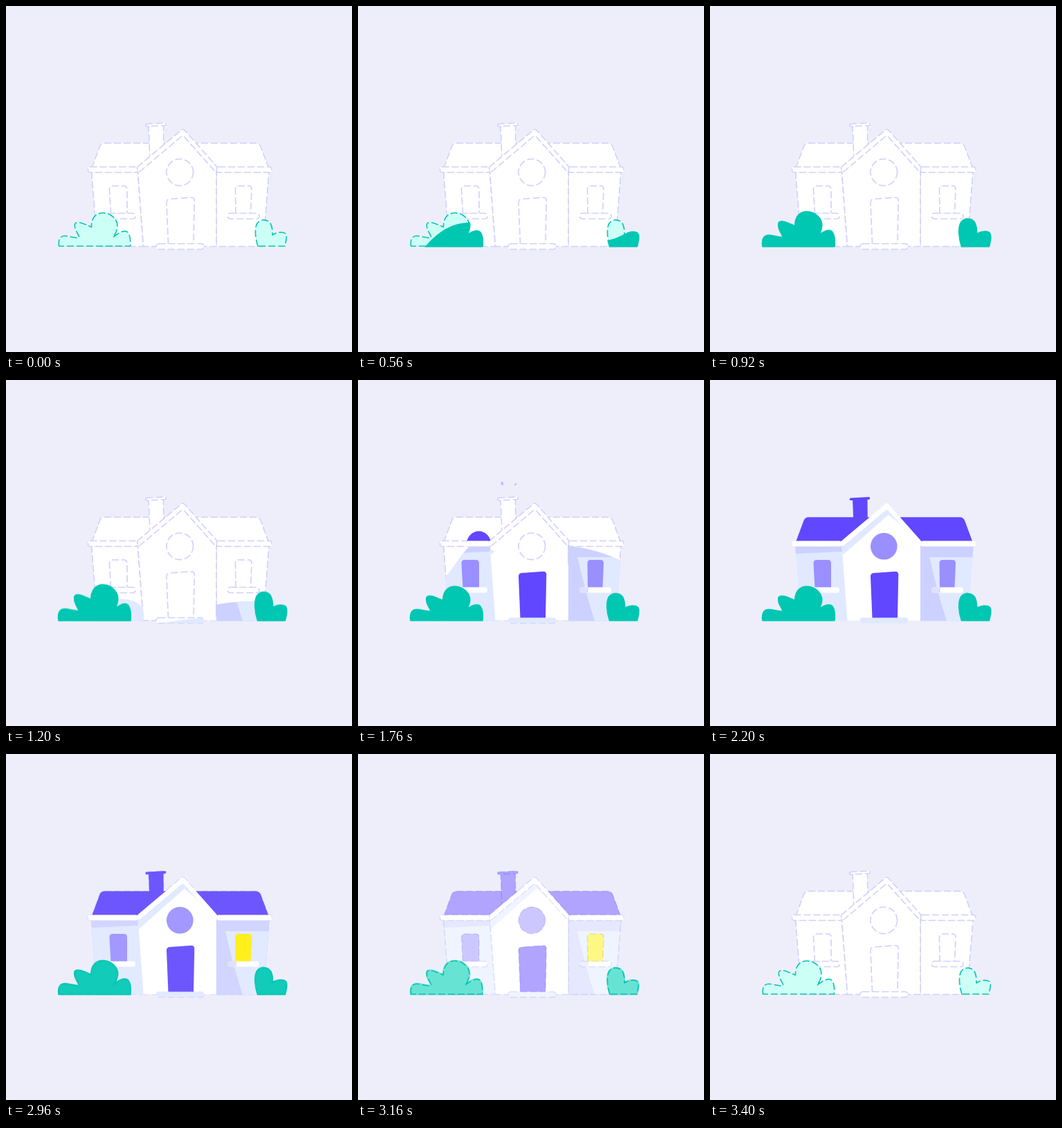
Animation of 500 by 500 pixels, one loop 3.52 s. Source, as an HTML page:

```html
<!DOCTYPE html>
<html lang="en">
<head>
<meta charset="utf-8">
<title>House being painted</title>
<style>
  html, body { margin: 0; width: 100%; height: 100%; overflow: hidden; background: #eeeefb; }
  .stage { position: relative; width: 500px; height: 500px; overflow: hidden; }
  .stage svg, .paint, .shrubs { position: absolute; inset: 0; width: 500px; height: 500px; }
  .stage * { animation: 3.52s linear infinite; }
  .paint, .shrubs { transform-origin: 250px 348px; }

  .sketch { animation-name: sketch; }
  .sketch use { fill: #fff; stroke: #d0d0fb; stroke-width: 1.6; stroke-dasharray: 9 5; stroke-linecap: round; stroke-linejoin: round; }
  .sketch .leaf { fill: #ccfff5; stroke: #00c7b2; }
  .leafy { fill: #00c7b2; stroke: #00c7b2; stroke-width: 3; stroke-linejoin: round; }
  .pale { fill: #e0e9ff; }
  .shade { fill: #cdd1ff; }
  .deep { fill: #6147ff; }
  .glass { fill: #9a8fff; }
  .white { fill: #fff; }

  .paint { animation-name: settle, fade; }
  .shrubs { animation-name: hop; }
  .bush-left { animation-name: bushLeft; }
  .bush-right { animation-name: bushRight; }
  .wall-left { animation-name: wallLeft; }
  .wall-right { animation-name: wallRight; }
  .front { animation-name: front; }
  .roof { animation-name: roof; }
  .lamp { animation-name: lamp; }
  .puff { fill: #c0b5ff; animation-name: puff; }
  .puff.a { --from: translate(22px, 38px); transform-origin: 192px 122px; }
  .puff.b { --from: translate(-20px, 34px); transform-origin: 242px 126px; }

  @keyframes sketch {
    0%, 54.5% { opacity: 1; }
    54.51%, 82.9% { opacity: 0; }
    82.91%, 100% { opacity: 1; }
  }
  @keyframes fade {
    0%, 82.95% { opacity: 1; }
    96.59%, 100% { opacity: 0; }
  }
  @keyframes settle {
    0%, 50% { transform: none; }
    54.2% { transform: scaleY(1.032); }
    55.68% { transform: scaleY(1.022); animation-timing-function: ease-out; }
    62.5%, 100% { transform: none; }
  }
  @keyframes hop {
    0%, 23.8% { transform: none; animation-timing-function: ease-out; }
    32% { transform: scaleY(1.06); }
    34.09% { transform: scaleY(1.05); animation-timing-function: ease-in-out; }
    39.7%, 100% { transform: none; }
  }
  @keyframes lamp {
    0%, 67.04% { fill: #9a8fff; }
    67.05%, 100% { fill: #ffee08; }
  }
  @keyframes puff {
    0%, 49.4% { transform: var(--from) scale(0); animation-timing-function: ease-out; }
    53.1% { transform: translate(0, 0) scale(1.9); }
    54.55% { transform: translate(0, 0) scale(1.15); }
    55.68% { transform: translate(0, 0) scale(1); }
    58.5%, 100% { transform: translate(0, 0) scale(0); }
  }

  /* Curved paint fronts that rise over each part */
  @keyframes bushLeft {
    0%, 7.5% { clip-path: path("M60 500V450C105 390 130 360 200 350V500Z"); }
    15.91% { clip-path: path("M60 500V400C105 330 130 300 200 318V500Z"); }
    22.73%, 100% { clip-path: path("M60 500V300C105 270 130 270 200 270V500Z"); }
  }
  @keyframes bushRight {
    0%, 7.5% { clip-path: path("M350 500V362C372 360 382 356 420 348V500Z"); }
    15.91% { clip-path: path("M350 500V339C372 340 382 330 420 312V500Z"); }
    22.73%, 100% { clip-path: path("M350 500V290C372 290 382 290 420 290V500Z"); }
  }
  @keyframes wallLeft {
    0%, 25% { clip-path: path("M110 500V375C150 350 190 350 205 365V500Z"); }
    34.09% { clip-path: path("M110 500V350C150 305 190 310 205 340V500Z"); }
    38.64% { clip-path: path("M110 500V325C150 265 180 245 205 268V500Z"); }
    50% { clip-path: path("M110 500V300C150 270 140 240 205 215V500Z"); }
    53.41%, 100% { clip-path: path("M110 500V220C150 220 140 210 205 200V500Z"); }
  }
  @keyframes wallRight {
    0%, 25% { clip-path: path("M295 500V360C320 352 350 350 390 352V500Z"); }
    34.09% { clip-path: path("M295 500V328C320 320 350 319 390 323V500Z"); }
    38.64% { clip-path: path("M295 500V262C325 252 355 252 390 264V500Z"); }
    50% { clip-path: path("M295 500V240C325 241 355 248 390 267V500Z"); }
    53.41%, 100% { clip-path: path("M295 500V210C325 210 355 215 390 225V500Z"); }
  }
  @keyframes front {
    0%, 31% { clip-path: path("M180 500V370C225 365 250 360 310 356V500Z"); }
    34.09% { clip-path: path("M180 500V358C225 352 250 346 310 342V500Z"); }
    38.64% { clip-path: path("M180 500V325C225 320 250 312 310 308V500Z"); }
    50% { clip-path: path("M180 500V236C200 252 215 265 310 268V500Z"); }
    53.41%, 100% { clip-path: path("M180 500V150C200 150 215 150 310 150V500Z"); }
  }
  @keyframes roof {
    0%, 48.5% { clip-path: ellipse(0px 0px at 176px 244px); }
    50% { clip-path: ellipse(16px 18px at 174px 238px); }
    53.6%, 100% { clip-path: ellipse(260px 220px at 250px 240px); }
  }
</style>
</head>
<body>
<div class="stage">
  <svg class="sketch" viewBox="0 0 500 500">
    <defs>
      <path id="chimney" d="M206 172L208 222H228L227.5 172Z"/>
      <path id="cap" d="M203 170.5L230 169Q232.500 171 230 172.700L203 174Q200 172.500 203 170.500Z"/>
      <path id="tiles" d="M124 234L135.500 203Q137.500 198.300 142 198.300H361Q366 198.300 368 203L379.500 234Z"/>
      <path id="wallL" d="M123.700 240L132 347.500H198.500L190.500 240Z"/>
      <path id="wallR" d="M304 240H380L371.500 347.500H304Z"/>
      <path id="facade" d="M190.500 239L255.500 185L304 238V347.500H198.500Z"/>
      <path id="gable" d="M190 232.500L253 179.500Q255.500 177 258 179.500L305 232.500Q305 238 302 239L258 189.500Q255.500 186 253 189L193 239.500Q189 240 190 232.500Z"/>
      <rect id="eaveL" x="118.500" y="232.500" width="72.500" height="8" rx="3.500"/>
      <rect id="eaveR" x="304" y="232.500" width="80" height="8" rx="3.500"/>
      <path id="paneL" d="M151.500 300L149.500 265Q149.500 260 154 260H170.500Q175 260 175 265V300Z"/>
      <path id="paneR" d="M332 300L331.500 265Q331.500 260 336 260H350.500Q355 260 355 265L353.500 300Z"/>
      <rect id="sillL" x="145" y="299.500" width="42" height="8" rx="3.500"/>
      <rect id="sillR" x="320.500" y="299.500" width="45.500" height="8" rx="3.500"/>
      <circle id="rose" cx="251.300" cy="240.300" r="19.300"/>
      <path id="door" d="M234.500 344L232 284Q232 279.500 236 279L267.500 276.700Q272 276.500 272.300 281L271 344Z"/>
      <rect id="step" x="217" y="343.500" width="69" height="8" rx="4"/>
      <path id="bushL" d="M76.500 347C75 335 80 331 88 332.500L105 335.500C108 331 98 326 99.500 315C102 310 111 314 123.500 319.500C123 305 131 299 140 299C152 299 162 309 161 319C160 327 157 331 154.500 334.500C163 327 172 323 176 327C180 332 180 341 179.500 347Z"/>
      <path id="bushR" d="M364 347C360 335 359 321 363 314C368 307 378 308 382 314C385 319 385 325 385 331C392 326 401 326 404 329C407 334 404 341 403 347Z"/>
    </defs>
    <use href="#tiles"/><use href="#chimney"/><use href="#cap"/>
    <use href="#wallL"/><use href="#wallR"/><use href="#facade"/>
    <use href="#eaveL"/><use href="#eaveR"/><use href="#gable"/>
    <use href="#paneL"/><use href="#paneR"/><use href="#sillL"/><use href="#sillR"/>
    <use href="#rose"/><use href="#door"/><use href="#step"/>
    <use class="leaf" href="#bushL"/><use class="leaf" href="#bushR"/>
  </svg>

  <div class="paint">
    <svg class="wall-left" viewBox="0 0 500 500">
      <use class="pale" href="#wallL" stroke="#e0e9ff" stroke-width="1.5"/>
      <path class="shade" d="M123 239H190.500L191 248L123.800 251Z"/>
      <use class="glass" href="#paneL"/>
      <use class="white" href="#sillL"/>
    </svg>
    <svg class="wall-right" viewBox="0 0 500 500">
      <use class="shade" href="#wallR" stroke="#cdd1ff" stroke-width="1.5"/>
      <path class="pale" d="M317 256H379.600L372 348.300H342Q328 305 317 256Z"/>
      <use class="glass lamp" href="#paneR"/>
      <use class="white" href="#sillR"/>
      <path fill="#e0dffc" d="M333 299.500H324Q320.500 300 320.500 303.500T324 307.500H333Z"/>
    </svg>
    <svg class="roof" viewBox="0 0 500 500">
      <use class="deep" href="#chimney"/>
      <use class="deep" href="#cap"/>
      <use class="deep" href="#tiles"/>
    </svg>
    <svg class="front" viewBox="0 0 500 500">
      <use class="white" href="#facade"/>
      <path class="pale" d="M190.500 239L255.500 185L282 215L258 194.500L192 253Z"/>
      <use class="glass" href="#rose"/>
      <use class="deep" href="#door"/>
      <use class="pale" href="#step"/>
    </svg>
    <svg class="roof" viewBox="0 0 500 500">
      <use class="white" href="#eaveL"/>
      <use class="white" href="#eaveR"/>
      <use class="white" href="#gable"/>
    </svg>
    <div class="shrubs">
      <svg class="bush-left" viewBox="0 0 500 500"><use class="leafy" href="#bushL"/></svg>
      <svg class="bush-right" viewBox="0 0 500 500"><use class="leafy" href="#bushR"/></svg>
    </div>
  </div>

  <svg viewBox="0 0 500 500">
    <path class="puff a" d="M195.500 127.500C190 125 187 121 189 117.500C191 115 195 116 195.500 120Z"/>
    <path class="puff b" d="M239 130C239 126 241 122 244 122.500C247 123 246.500 126 239 130Z"/>
  </svg>
</div>
</body>
</html>
```
